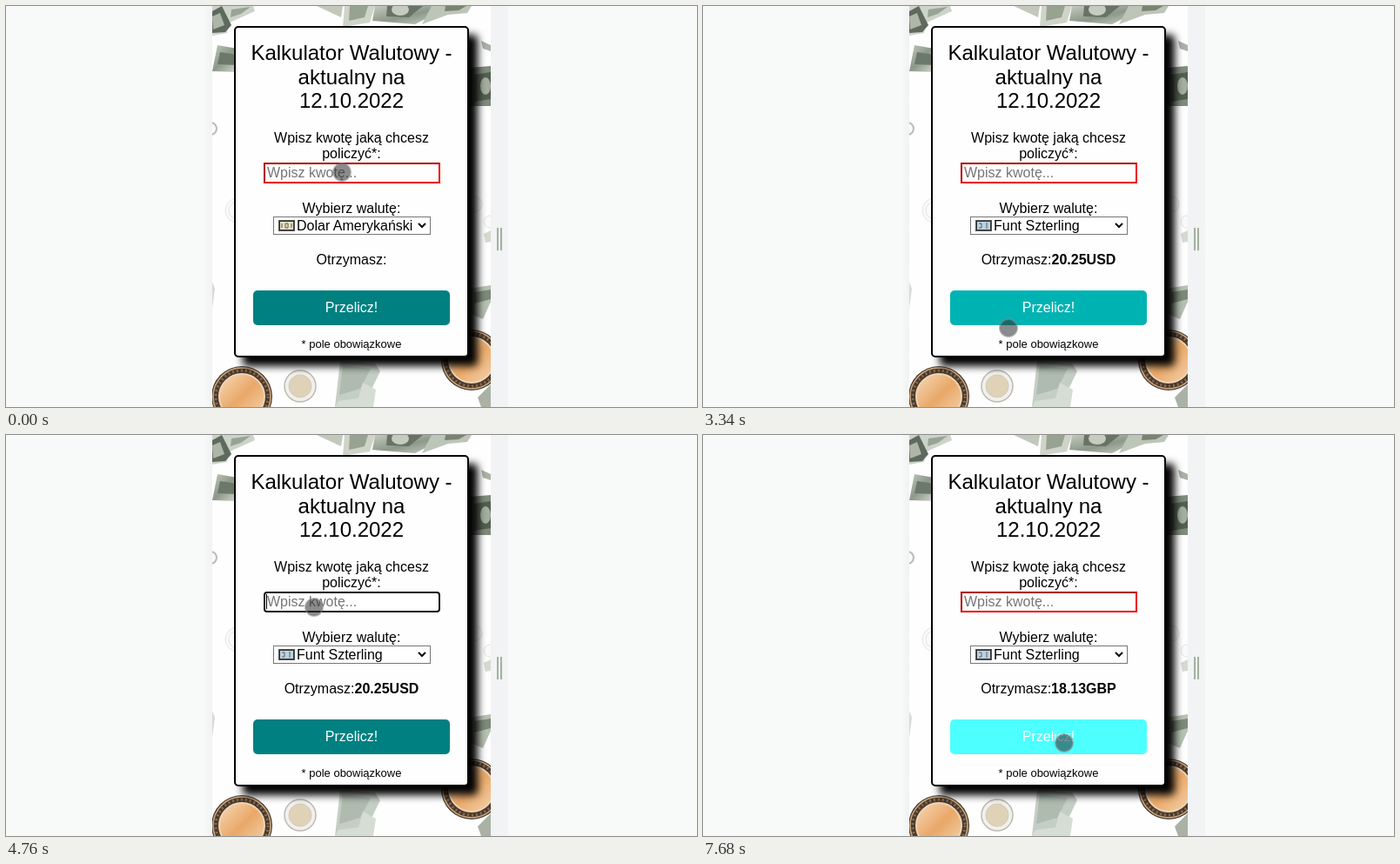
An HTML page that plays this animation: 794x461 px, repeating every 8 s.

```html
<!DOCTYPE html>
<html lang="pl">
<head>
<meta charset="utf-8">
<title>Kalkulator Walutowy</title>
<style>
  html, body { margin: 0; width: 100%; height: 100%; overflow: hidden; background: #f8faf9; }
  svg { display: block; width: 794px; height: 461px; }
  text { font: 16px "Liberation Sans", Arial, sans-serif; fill: #000; white-space: pre; }
  .mid { text-anchor: middle; }
  .title { font-size: 24px; }
  .small { font-size: 13px; }
  .bold { font-weight: bold; }
</style>
</head>
<body>
<svg viewBox="0 0 794 461">
  <defs>
    <filter id="blur" x="-20%" y="-20%" width="140%" height="140%"><feGaussianBlur stdDeviation="5"/></filter>
    <filter id="soft"><feGaussianBlur stdDeviation=".7"/></filter>
    <clipPath id="view"><rect x="237" width="320" height="461"/></clipPath>
    <linearGradient id="edge"><stop stop-color="#f8faf9"/><stop offset="1" stop-color="#f1f3f3"/></linearGradient>
    <linearGradient id="gold" x2="1" y2="1"><stop stop-color="#f6d9b8"/><stop offset=".5" stop-color="#e9a868"/><stop offset="1" stop-color="#f4d4b0"/></linearGradient>
    <linearGradient id="bill" x2="1" y2="1"><stop stop-color="#c3cabd"/><stop offset=".5" stop-color="#8d988a"/><stop offset="1" stop-color="#d3d8cf"/></linearGradient>
    <g id="coin">
      <circle r="35" fill="#4a3a2d"/>
      <circle r="33" fill="none" stroke="#d2ad85" stroke-width="1.5"/>
      <circle r="30" fill="none" stroke="#8b6c50" stroke-width="3" stroke-dasharray="2 3"/>
      <circle r="26" fill="url(#gold)" stroke="#f0d5b5" stroke-width="2"/>
    </g>
  </defs>

  <rect width="794" height="461" fill="#f8faf9"/>
  <rect x="227" width="10" height="461" fill="url(#edge)"/>
  <rect x="557" width="20" height="461" fill="#f1f3f4"/>
  <path d="M565 255v26M569 255v26" stroke="#a3b3a0" stroke-width="2"/>

  <g clip-path="url(#view)">
    <rect x="237" width="320" height="461" fill="#fefefe"/>
    <g id="money" filter="url(#soft)">
      <path d="M237 0H284L286 6 257 19 254 31 237 34Z" fill="#cdd3c9"/>
      <path d="M237 6 248 0 259 22 252 30 237 31Z" fill="#5f6a5e"/>
      <path d="M237 12 246 8 251 22 238 27Z" fill="#aeb6a9"/>
      <path d="M259 4 281 1 270 9 258 13Z" fill="#98a394"/>
      <path d="M243 45 266 49 266 76 237 75Z" fill="url(#bill)"/>
      <path d="M246 53 266 56V68L243 67Z" fill="#6c786a"/>
      <path d="M357 0H387L385 13Z" fill="#c3c8bc"/>
      <path d="M389 0H424L418 19 387 24Z" fill="#cfd4c9"/>
      <path d="M395 0H416L412 13 394 17Z" fill="#98a291"/>
      <path d="M424 0H511L470 21 421 17Z" fill="url(#bill)"/>
      <path d="M438 0H479L463 13 437 12Z" fill="#687365"/>
      <ellipse cx="453" cy="4" rx="10" ry="7" fill="#c5ccbf"/>
      <path d="M489 0H535L530 8 508 10 478 21Z" fill="#bcc5b8"/>
      <path d="M505 0H529L520 5 504 6Z" fill="#78846f"/>
      <path d="M546 40 557 45V52L548 49Z" fill="#a9b2a6"/>
      <path d="M532 71 557 69V115H532Z" fill="#7f8b7c"/>
      <path d="M538 79 557 76V107L538 110Z" fill="#535f51"/>
      <ellipse cx="551" cy="92" rx="6" ry="10" fill="#a4ae9f"/>
      <g fill="#fafafa" stroke="#e3e4e2">
        <circle cx="235" cy="141" r="7" stroke="#b9bbb8" stroke-width="2"/>
        <circle cx="266" cy="235" r="14"/><circle cx="266" cy="235" r="10"/>
        <circle cx="538" cy="228" r="9"/><circle cx="556" cy="248" r="7"/>
      </g>
      <path d="M549 262 557 258V271L551 272Z" fill="#d5dad1"/>
      <path d="M532 325 557 321V340L548 360 532 353Z" fill="#b7c1b3"/>
      <path d="M538 329 557 326V337L538 342Z" fill="#7d8979"/>
      <path d="M237 317 240 325 237 348Z" fill="#d7dad5"/>
      <use href="#coin" x="271" y="449"/>
      <use href="#coin" x="535" y="407"/>
      <circle cx="338" cy="437" r="18" fill="#f2f0eb" stroke="#bbb9b1" stroke-width="1.5"/>
      <circle cx="338" cy="437" r="13" fill="#dfd2b7" stroke="#cfcbc2"/>
      <path d="M384 408 424 411 430 420 410 461H378Z" fill="#c5cec4"/>
      <path d="M387 413 419 417 407 440 383 447Z" fill="#aebbae"/>
      <path d="M410 433 425 441 422 461H378L382 454 405 451Z" fill="#d6ddd5"/>
      <path d="M542 450 557 435V461H546Z" fill="#a9b2a4"/>
    </g>
    <rect x="272" y="33" width="270" height="381" rx="5" filter="url(#blur)"/>
  </g>

  <rect x="263" y="24" width="268" height="379" rx="4" fill="#fefefe" stroke="#000" stroke-width="2"/>
  <g class="mid">
    <text class="title" x="397" y="62">Kalkulator Walutowy -</text>
    <text class="title" x="397" y="90">aktualny na</text>
    <text class="title" x="397" y="117">12.10.2022</text>
    <text x="397" y="157">Wpisz kwotę jaką chcesz</text>
    <text x="397" y="175">policzyć*:</text>
    <text x="397" y="238">Wybierz walutę:</text>
    <text x="397" y="297">Otrzymasz:<tspan id="result" class="bold"></tspan></text>
    <text class="small" x="397" y="393">* pole obowiązkowe</text>
  </g>

  <g id="empty" fill="none" stroke-width="2">
    <path d="M297 204V181H499" stroke="#b00000"/>
    <path d="M297 203H498V181" stroke="#ee0000"/>
  </g>
  <rect id="focus" x="297" y="181" width="201" height="22" rx="3" fill="#fff" stroke="#101010" stroke-width="2"/>
  <text id="amount" x="300" y="197"></text>
  <path id="caret" d="M0 183v17" stroke="#000"/>

  <rect x="307.5" y="242.5" width="180" height="20" fill="#fff" stroke="#767676"/>
  <rect x="313.5" y="246.5" width="18" height="12" fill="#333" stroke="#555"/>
  <rect id="note" x="315" y="248" width="15" height="9"/>
  <path id="marks" fill="none" stroke="#665f4c"/>
  <text id="currency" x="334" y="258"></text>
  <path d="M474 250l4 4 4-4" fill="none" stroke="#000" stroke-width="2"/>

  <rect id="button" x="284" y="327" width="226" height="40" rx="5"/>
  <text class="mid" x="397" y="352" style="fill:#fff">Przelicz!</text>

  <circle id="touch" r="10" fill="#282c30" fill-opacity=".55" stroke="#888" stroke-opacity=".55" stroke-width="2"/>
</svg>
<script>
const $ = id => document.getElementById(id);
const LOOP = 8000, BLINK = 530;

// Touch pointer: time, x, y
const path = [
  [0, 386, 191], [2709, 386, 191], [2710, 415, 241], [2850, 419, 310],
  [3000, 395, 358], [3200, 351, 370], [3800, 351, 370], [4000, 353, 290],
  [4250, 355, 216], [4420, 355, 201], [4560, 354, 198], [6660, 354, 198],
  [6820, 382, 270], [7020, 421, 362], [7280, 415, 354], [LOOP, 415, 354]
];

// Each round: focus, three key presses, submit
const rounds = [[590, 1320, 1520, 1730, 3340], [4760, 5300, 5570, 5690, 7480]];

// Button colour changes
const colors = [[0, '#008080'], [3340, '#00b3b3'], [3550, '#4dffff'],
  [4760, '#008080'], [7480, '#00b3b3'], [7680, '#4dffff']];

const latest = (list, t) => list.filter(k => k[0] <= t).pop();
const show = (id, on) => $(id).setAttribute('visibility', on ? 'visible' : 'hidden');

function pointer(t) {
  const i = path.findIndex(p => p[0] > t);
  const [t0, x0, y0] = path[i - 1], [t1, x1, y1] = path[i];
  const k = (t - t0) / (t1 - t0);
  return [x0 + (x1 - x0) * k, y0 + (y1 - y0) * k];
}

function draw(now) {
  const t = now % LOOP;
  const round = rounds.find(r => t >= r[0] && t < r[4]);
  const typed = round ? round.slice(1, 4).filter(k => k <= t).length : 0;
  const edited = round ? round[typed] : 0;

  show('focus', round);
  show('empty', !round);
  show('caret', round && Math.floor((t - edited) / BLINK) % 2 === 0);
  $('caret').setAttribute('transform', `translate(${Math.round(300 + 8.9 * typed) - .5})`);
  $('amount').textContent = typed ? '100'.slice(0, typed) : 'Wpisz kwotę...';
  $('amount').style.fill = typed ? '#000' : '#757575';

  const reset = t >= 3340;
  $('currency').textContent = reset ? 'Funt Szterling' : 'Dolar Amerykański';
  $('note').setAttribute('fill', reset ? '#b9d3e6' : '#e5dfc4');
  $('marks').setAttribute('d', reset ? 'M317 250h3v5h-3M326 249v7' : 'M317 250v5M328 250v5M321 250h3v5h-3z');
  $('result').textContent = !reset ? '' : t < 7480 ? '20.25USD' : '18.13GBP';

  $('button').setAttribute('fill', latest(colors, t)[1]);
  $('touch').setAttribute('transform', `translate(${pointer(t)})`);
}

const start = performance.now();
function tick() {
  draw(performance.now() - start);
  requestAnimationFrame(tick);
}
tick();
</script>
</body>
</html>
```
